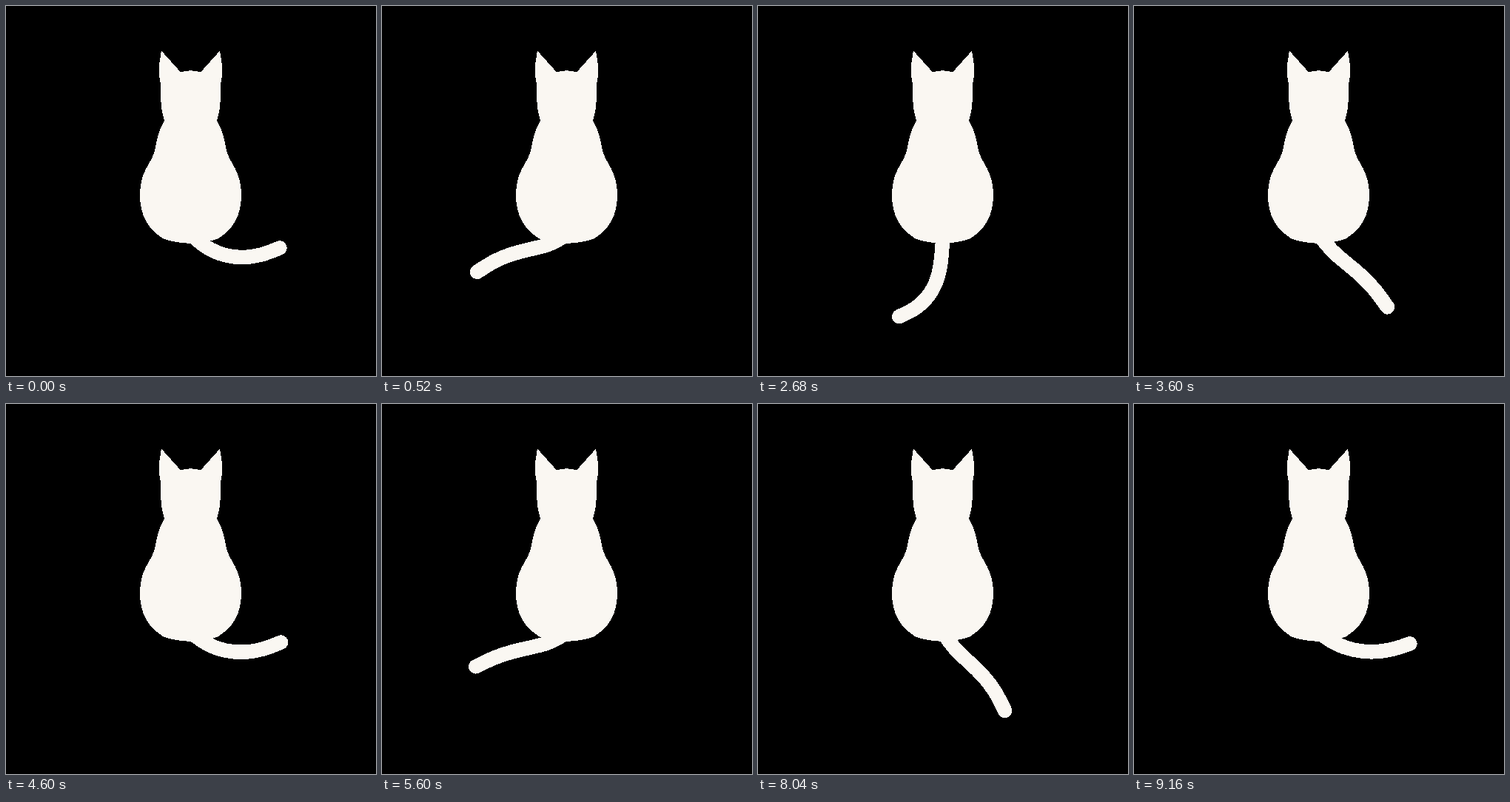
An HTML page for the animation above (9.2 s loop, 500 px wide and 500 px high).

```html
<!DOCTYPE html>
<html lang="en">
<head>
<meta charset="utf-8">
<title>Cat swinging its tail</title>
<style>
  html, body { margin: 0; width: 100%; height: 100%; overflow: hidden; background: #000; }
  svg { display: block; width: 100vw; height: 100vh; }
</style>
</head>
<body>
<svg viewBox="0 0 500 500" fill="#faf7f2" shape-rendering="crispEdges">
  <path id="half" d="M252 87.3C246 87 240 88 236 89.5L210 60.5C208 72 206.5 82 206.5 90
    C207 96 209.5 104 209.5 115C208.5 130 210 142 214 155C207 166 204 180 201 195
    C197 213 181 222 181 255C181 285 193 302 212 314C220 318 236 320.5 252 321Z"/>
  <use href="#half" transform="matrix(-1 0 0 1 499 0)"/>
  <path id="tail" fill="none" stroke="#faf7f2" stroke-width="19.5" stroke-linecap="round" stroke-linejoin="round"/>
</svg>
<script>
const LOOP = 9200, SWING = 4620;
const LEAD = 50;          // the first flick is already this far along at the start
const TURN = 2530;        // time from the flick to the left until the flick to the right
const FLICK = 350, DELAY = 12;
const ROOT = [250, 309], BONES = 5;

const mix = (a, b, t) => a + (b - a) * t;
const clamp = t => Math.min(1, Math.max(0, t));
const smooth = t => t * t * (3 - 2 * t);

// Bone headings in degrees away from straight down, towards the side of the swing.
const raised = i => 56 + 16 * i - i * i / 2;
const hangLeft = i => [60, 77, 76, 66, 54][i];
const hangRight = i => hangLeft(i) - 30 - 5 * i;

// Each half swing flicks across, root first, then drifts up to the raised pose.
function heading(i, time) {
  const toLeft = time < TURN;
  const elapsed = toLeft ? time : time - TURN;
  const drift = elapsed / (toLeft ? TURN : SWING - TURN);
  const hang = toLeft ? hangLeft(i) : hangRight(i);
  const flick = smooth(clamp((elapsed - DELAY * i) / FLICK));
  const angle = mix(-raised(i), mix(hang, raised(i), drift * drift), flick);
  return (toLeft ? -angle : angle) * Math.PI / 180;
}

function tailPath(time) {
  let [x, y] = ROOT;
  let path = `M${x} ${y}`;
  for (let i = 0; i < BONES; i++) {
    const angle = heading(i, time);
    const length = 26 + 1.5 * Math.cos(angle);
    const dx = length * Math.sin(angle), dy = length * Math.cos(angle);
    // Joints act as control points, bone midpoints lie on the curve.
    path += `${i ? `Q${x} ${y} ` : 'L'}${x + dx / 2} ${y + dy / 2}`;
    x += dx;
    y += dy;
  }
  return path + `L${x} ${y}`;
}

const tail = document.getElementById('tail');
const start = performance.now();

function draw() {
  const time = (performance.now() - start) % LOOP;
  tail.setAttribute('d', tailPath((time + LEAD) % SWING));
  requestAnimationFrame(draw);
}
draw();
</script>
</body>
</html>
```
